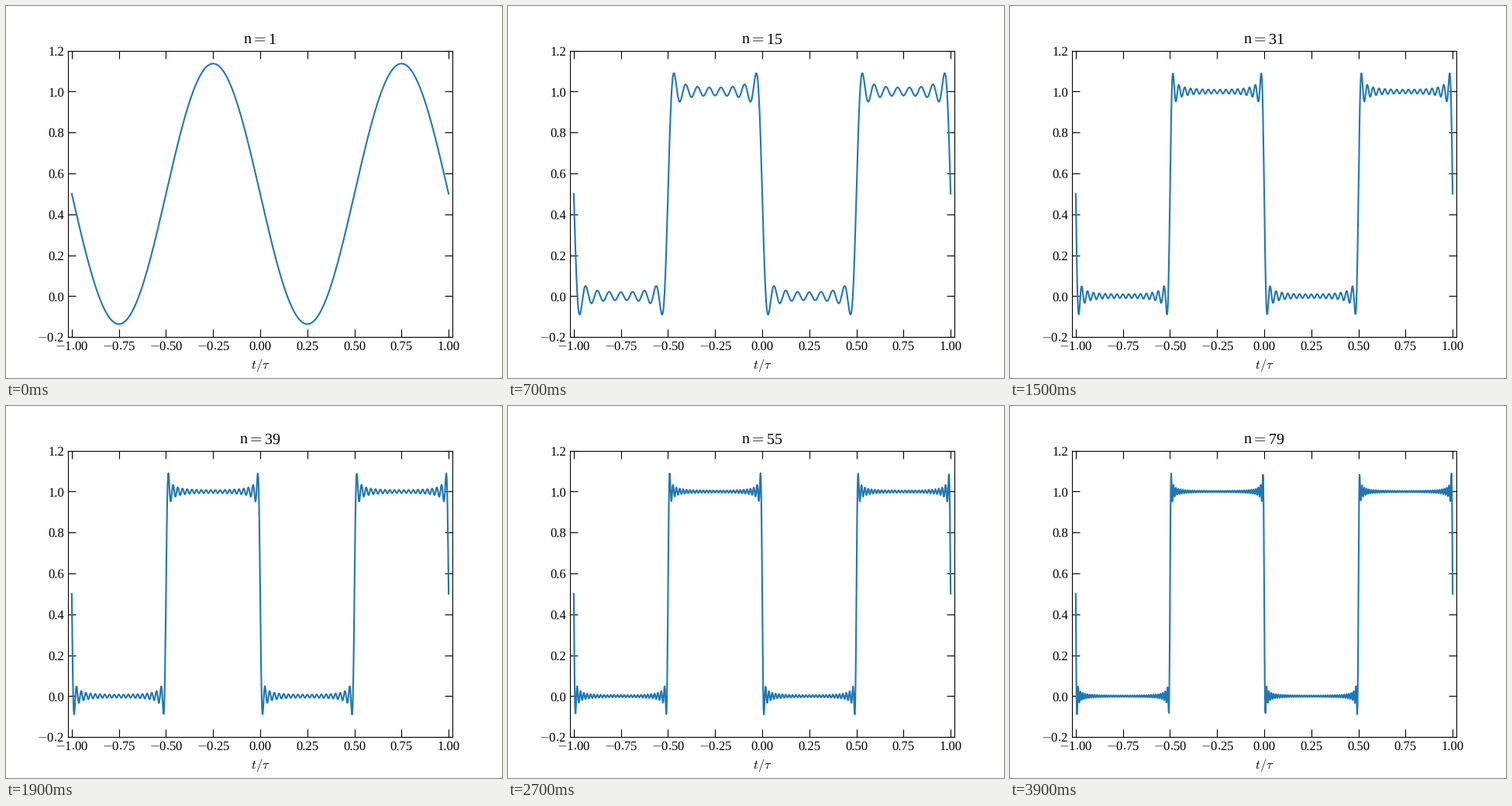
Write a matplotlib script that moves like this. It is 640 px wide and 480 px high and loops after 4 s.

```python
import matplotlib.pyplot as plt
import numpy as np
from matplotlib.animation import FuncAnimation

FRAMES = 40
INTERVAL = 100

plt.rcParams.update({
    "font.family": "Liberation Serif",
    "font.size": 12,
    "mathtext.fontset": "cm",
    "text.hinting": "no_hinting",
})

t = np.linspace(-1, 1, 1000)


def square_wave(n):
    """Fourier sum of a square wave with odd harmonics up to n."""
    k = np.arange(1, n + 1, 2)[:, None]
    return 0.5 - (2 / np.pi) * (np.sin(2 * np.pi * k * t) / k).sum(axis=0)


def tick_labels(values, digits):
    return [f"{v:.{digits}f}".replace("-", "$-$") for v in values]


fig, ax = plt.subplots(figsize=(6.4, 4.8), dpi=100)
line, = ax.plot(t, square_wave(1), color="#1f77b4", lw=1.5)
title = ax.set_title("", fontsize=14.4)
ax.set_xlabel(r"$t/\tau$")

x_ticks = np.arange(-4, 5) / 4
y_ticks = np.arange(-1, 7) / 5
ax.set_xticks(x_ticks, tick_labels(x_ticks, 2))
ax.set_yticks(y_ticks, tick_labels(y_ticks, 1))
ax.tick_params(direction="in", length=7, width=0.8, top=True, right=True)
ax.set_xlim(-1.02, 1.02)
ax.set_ylim(-0.2, 1.2)


def update(i):
    n = 2 * i + 1
    line.set_ydata(square_wave(n))
    title.set_text(f"n$=${n}")
    return line, title


anim = FuncAnimation(fig, update, frames=FRAMES, interval=INTERVAL,
                     repeat=True, repeat_delay=0)
plt.show()
```
